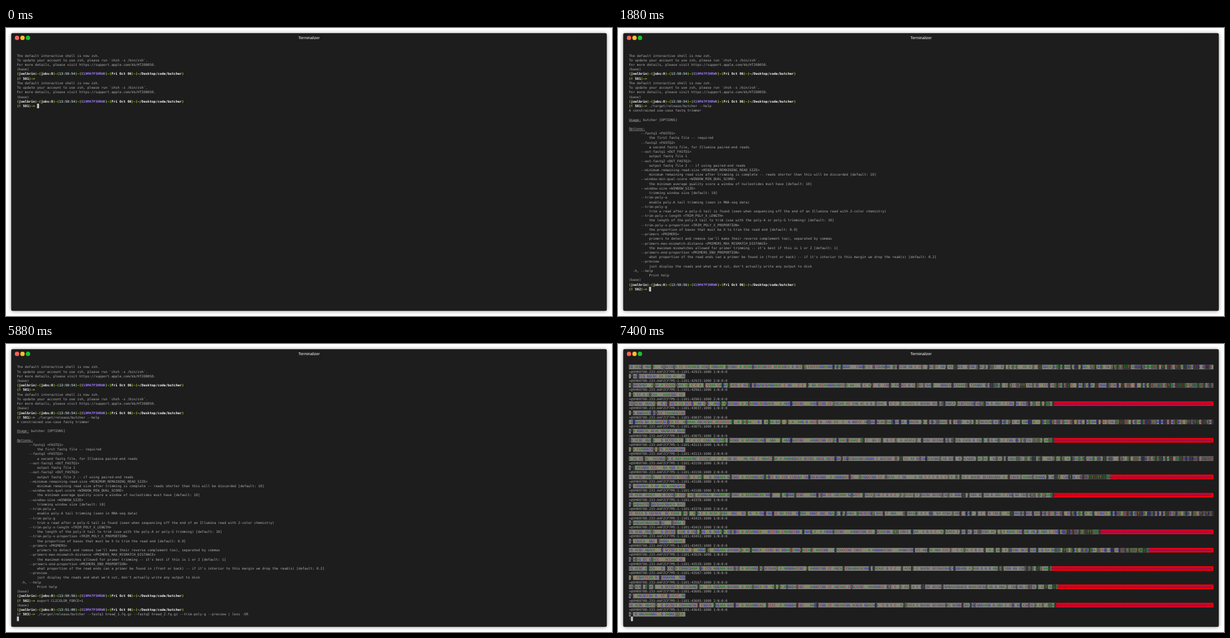
Recreate the animation shown at these times as an HTML page. Size 1083x517 px, loop 8000 ms.

```html
<!DOCTYPE html>
<html lang="en">
<head>
<meta charset="utf-8">
<title>Terminal</title>
<style>
html, body { margin: 0; width: 100%; height: 100%; overflow: hidden; background: #fff; }
svg { display: block; width: 1083px; height: 517px; }
text { white-space: pre; text-rendering: geometricPrecision; }
#screens { font: 5.983px "DejaVu Sans Mono", monospace; fill: #afafaf; }
.g { fill: #b3e33b; font-weight: bold; }
.w { fill: #f9f9f4; font-weight: bold; }
.c { fill: #b1c6ca; font-weight: bold; }
.m { fill: #a27cf8; font-weight: bold; }
.u { text-decoration: underline; }
.title { font: 7.1px "Liberation Sans", Arial, sans-serif; fill: #fff; text-anchor: middle; }
</style>
</head>
<body>
<svg viewBox="0 0 1083 517" xml:space="preserve">
<defs><filter id="blur" x="-5%" y="-5%" width="110%" height="110%"><feGaussianBlur stdDeviation="3.5"/></filter></defs>
<rect x="9.5" y="10" width="1064" height="498" rx="3" opacity=".42" filter="url(#blur)"/>
<rect x="9.3" y="9.3" width="1064.4" height="498.4" rx="2.5" fill="#1d1d1d"/>
<circle cx="19.7" cy="17.7" r="3.9" fill="#ff5f58"/>
<circle cx="29.5" cy="17.7" r="3.9" fill="#ffbd2e"/>
<circle cx="39.3" cy="17.7" r="3.9" fill="#18c132"/>
<text class="title" x="541.5" y="20.3">Terminalizer</text>
<g id="screens"></g>
</svg>
<script>
const LEFT = 19.5, TOP = 37.2, CW = 3.602, LH = 8.22, ROWS = 56, COLS = 290, LOOP = 8000;

const esc = s => s.replace(/&/g, '&amp;').replace(/</g, '&lt;');
const span = ([s, cls]) => `<tspan class="${cls || ''}">${esc(s)}</tspan>`;
const textAt = (row, body, fill) =>
  `<text x="${LEFT}" y="${(TOP + row * LH + 6.1).toFixed(2)}"${fill ? ` fill="${fill}"` : ''}>${body}</text>`;
const cell = (row, col, n, fill) =>
  `<rect x="${(LEFT + col * CW).toFixed(2)}" y="${(TOP + row * LH).toFixed(2)}" width="${(n * CW).toFixed(2)}" height="${LH}" fill="${fill}"/>`;
const cursor = (row, col) => cell(row, col, 1, '#c7c7c7');

// Shell session
const login = [
  'The default interactive shell is now zsh.',
  'To update your account to use zsh, please run `chsh -s /bin/zsh`.',
  'For more details, please visit https://support.apple.com/kb/HT208050.'
];

function prompt(time, num, cmd) {
  const join = [')-(', 'g'];
  return ['(base)',
    [['(', 'g'], ['joelbrin', 'w'], join, ['jobs:0', 'w'], join, [time, 'c'], join, ['X19M47P3HRWK', 'm'],
      join, ['Fri Oct 06', 'w'], join, ['~/Desktop/code/butcher', 'w'], [')', 'g']],
    [['(', 'g'], ['! ' + num, 'w'], [')->', 'g'], [' ' + cmd]]];
}

const options = `fastq1 <FASTQ1>|the first fastq file -- required
fastq2 <FASTQ2>|a second fastq file, for Illumina paired-end reads
out-fastq1 <OUT_FASTQ1>|output fastq file 1
out-fastq2 <OUT_FASTQ2>|output fastq file 2 -- if using paired-end reads
minimum-remaining-read-size <MINIMUM_REMAINING_READ_SIZE>|minimum remaining read size after trimming is complete -- reads shorter than this will be discarded [default: 10]
window-min-qual-score <WINDOW_MIN_QUAL_SCORE>|the minimum average quality score a window of nucleotides must have [default: 10]
window-size <WINDOW_SIZE>|trimming window size [default: 10]
trim-poly-a|enable poly-A tail trimming (seen in RNA-seq data)
trim-poly-g|trim a read after a poly-G tail is found (seen when sequencing off the end of an Illumina read with 2-color chemistry)
trim-poly-x-length <TRIM_POLY_X_LENGTH>|the length of the poly-X tail to trim (use with the poly-A or poly-G trimming) [default: 10]
trim-poly-x-proportion <TRIM_POLY_X_PROPORTION>|the proportion of bases that must be X to trim the read end [default: 0.9]
primers <PRIMERS>|primers to detect and remove (we'll make their reverse complement too), separated by commas
primers-max-mismatch-distance <PRIMERS_MAX_MISMATCH_DISTANCE>|the maximum mismatches allowed for primer trimming -- it's best if this is 1 or 2 [default: 1]
primers-end-proportion <PRIMERS_END_PROPORTION>|what proportion of the read ends can a primer be found in (front or back) -- if it's interior to this margin we drop the read(s) [default: 0.2]
preview|just display the reads and what we'd cut, don't actually write any output to disk`;

const help = ['A constrained use-case fastq trimmer', '',
  [['Usage:', 'u'], [' butcher [OPTIONS]']], '', [['Options:', 'u']],
  ...options.split('\n').flatMap(o => {
    const [flag, about] = o.split('|');
    return ['      --' + flag, ' '.repeat(10) + about];
  }),
  '  -h, --help', ' '.repeat(10) + 'Print help'];

const first = cmd => ['', ...login, ...prompt('13:50:54', 501, ''), ...login, ...prompt('13:50:54', 501, cmd)];
const ran = first('./target/release/butcher --help');
const helped = cmd => [...ran, ...help, ...prompt('13:50:56', 502, cmd)];
const exported = cmd => [...helped('export CLICOLOR_FORCE=1'), ...prompt('13:51:00', 503, cmd)];
const preview = exported('./target/release/butcher --fastq1 hread_1.fq.gz --fastq2 hread_2.fq.gz --trim-poly-g --preview | less -SR');

function shell(lines) {
  const rows = lines.slice(-ROWS).map(l => typeof l === 'string' ? [[l]] : l);
  const end = rows.length - 1;
  const width = rows[end].reduce((n, s) => n + s[0].length, 0);
  return cursor(end, width) + rows.map((l, i) => textAt(i, l.map(span).join(''))).join('');
}

// Reads: id and, after a colon, the first trimmed column, or p for an untrimmed read with the primer
const reads = `42241:276 42279 42317:211 42355:211 42393:p 42469:206 42544
  42582:201 42620 42696:p 42734:236 42772:214 42847 42885:p
  42923 42961:211 43037 43075:211 43113 43150:239 43188:211
  43378 43415:234 43453:258 43529:210 43567:213 43605:212 43643`;

const primer = 'CGTACGCTAGACATTTGTGCCGCATC';
const anchor = 'TAGGAAATGACGGCTATACAAGGC';
const middle = 'TTATAGGGGACCGCTTTAAGGCCGGTCCTAGCAA';
const adapter = 'CTGTCTCTTATACACATCTGACGCTGCCGACGA';
const ending = 'GTGTAGATCTCGGTGGTCGCCGTATCATTAAAA';

let seed = 7;
const rand = () => (seed = (seed * 16807) % 2147483647) / 2147483647;
const bases = n => Array.from({ length: n }, () => 'ACGT'[Math.floor(rand() * 4)]).join('');

// Fixed parts keep their order; a long read gets its extra bases before the middle part
function longRead(cut, primed) {
  if (!cut) {
    const head = primed ? primer + bases(14) + anchor : '';
    return head + bases(COLS - head.length);
  }
  const start = primer + bases(15) + anchor + 'A' + bases(7 + Math.max(0, cut - 214)) + middle + bases(19) + adapter;
  const tail = cut === 276 ? 'CAAGGAAGGAAAGG' : 'G'.repeat(COLS - cut);
  return start + bases(Math.max(0, cut - start.length - ending.length)) + ending.slice(start.length + ending.length > cut ? start.length + ending.length - cut : 0) + tail;
}

const pager = reads.split(/\s+/).flatMap(r => {
  const [id, mark] = r.split(':'), cut = +mark || 0;
  const head = n => `>@VH00708:233:AAFZCF7M5:1:1101:${id}:1000 ${n}:N:0:0`;
  return [head(1), { seq: (rand() < 0.6 ? 'GT' : 'TT') + bases(26) }, head(2), { seq: longRead(cut, mark === 'p'), cut }];
});

// Chance that a base has low quality, shown as a darker cell
function doubt(col, len, cut) {
  if (len < 40) return col === 1 ? 1 : col ? 0.05 : 0;
  if (!cut) return 0.08 + 0.8 * (col / len) ** 2.6;
  return 0.05 + 0.12 * col / cut + (cut - col < 16 ? 0.4 : 0) + (col > 210 ? 0.4 : 0);
}

const inks = { A: '#007a00', C: '#8e1226', G: '#1414b4', T: '#8f8f35' };

function readRow(row, { seq, cut }) {
  const end = cut || seq.length;
  let out = cell(row, 0, end, '#82827c');
  for (let c = 0; c < end; c++)
    if (rand() < doubt(c, seq.length, cut))
      out += cell(row, c, 1, seq.length < 40 && c === 1 ? '#151515' : rand() < 0.5 ? '#343434' : '#5a5a56');
  if (cut) out += cell(row, cut, COLS - cut, '#ff0000');
  for (const b in inks)
    out += textAt(row, seq.replace(/./g, ch => ch === b ? b : ' '), inks[b]);
  return out;
}

const page = from => pager.slice(from, from + ROWS - 1)
  .map((l, i) => l.seq ? readRow(i, l) : textAt(i, esc(l))).join('') +
  textAt(ROWS - 1, ':') + cursor(ROWS - 1, 1);

const scenes = [
  [0, shell(first(''))],
  [1160, shell(ran)],
  [1860, shell([...ran, ''])],
  [1880, shell(helped(''))],
  [3880, shell(exported(''))],
  [5880, shell([...preview, ''])],
  [5940, page(0)],
  [7400, page(ROWS - 1)]
];

const screens = document.getElementById('screens');
screens.innerHTML = scenes.map(s => `<g display="none">${s[1]}</g>`).join('');
let shown = -1;

function draw(t) {
  const now = scenes.filter(s => s[0] <= t).length - 1;
  if (now === shown) return;
  if (shown >= 0) screens.children[shown].setAttribute('display', 'none');
  screens.children[now].removeAttribute('display');
  shown = now;
}

const start = performance.now();
function tick() {
  draw((performance.now() - start) % LOOP);
  requestAnimationFrame(tick);
}
tick();
</script>
</body>
</html>
```
